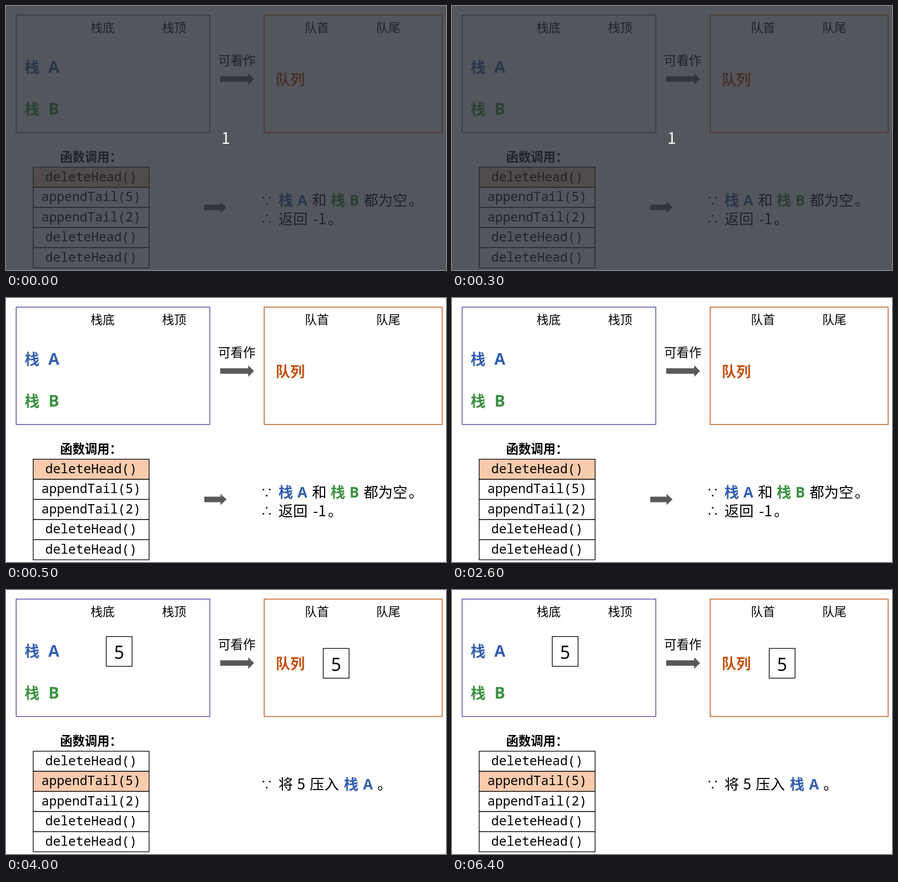
An HTML page with a canvas that plays this animation: 801 by 479 pixels, repeating every 8 s.

```html
<!DOCTYPE html>
<html lang="zh-CN">
<head>
<meta charset="utf-8">
<title>双栈实现队列</title>
<style>
  html, body { margin: 0; width: 100%; height: 100%; overflow: hidden; background: #fff; }
  canvas { display: block; }
</style>
</head>
<body>
<canvas id="stage" width="801" height="479"></canvas>
<script>
const ctx = document.getElementById('stage').getContext('2d');
const LOOP = 8000, START = 500, PUSH = 4000;
const BLUE = '#335fb0', GREEN = '#3a9140', ORANGE = '#c55114', GRAY = '#595959', BLACK = '#000';
const CJK = '"Noto Sans CJK SC", "Noto Sans CJK", sans-serif';
const LIGHT = '"Noto Sans CJK SC Light", "Noto Sans CJK SC DemiLight", ' + CJK;
const LATIN = '"Noto Sans", "Open Sans", sans-serif';
const MONO = '"Noto Sans Mono", monospace';
const CALLS = ['deleteHead()', 'appendTail(5)', 'appendTail(2)', 'deleteHead()', 'deleteHead()'];

function text(str, x, y, size, { family = CJK, weight = 400, color = BLACK, align = 'left' } = {}) {
  ctx.font = `${weight} ${size}px ${family}`;
  ctx.fillStyle = color;
  ctx.textAlign = align;
  ctx.fillText(str, x, y);
}

function box(x, y, w, h, color, line, fill) {
  if (fill) {
    ctx.fillStyle = fill;
    ctx.fillRect(x, y, w, h);
  }
  ctx.strokeStyle = color;
  ctx.lineWidth = line;
  ctx.strokeRect(x, y, w, h);
}

function arrow(x, y, shaft, length, half, head) {
  ctx.fillStyle = GRAY;
  ctx.beginPath();
  ctx.moveTo(x, y - half);
  ctx.lineTo(x + shaft, y - half);
  ctx.lineTo(x + shaft, y - head);
  ctx.lineTo(x + length, y);
  ctx.lineTo(x + shaft, y + head);
  ctx.lineTo(x + shaft, y + half);
  ctx.lineTo(x, y + half);
  ctx.fill();
}

function panels() {
  box(18.5, 16.5, 352.5, 213, '#3c3c9c', 1.3);
  box(470, 16.5, 324, 213, ORANGE, 1.4);
  const label = (str, x) => text(str, x, 46.7, 22, { family: LIGHT, weight: 300 });
  label('栈底', 154);
  label('栈顶', 284);
  label('队首', 544);
  label('队尾', 674);

  const stack = (name, y, color) => {
    text('栈', 34, y, 27, { weight: 700, color });
    text(name, 87, y, 29, { family: LATIN, weight: 700, color, align: 'center' });
  };
  stack('A', 121, BLUE);
  stack('B', 196.5, GREEN);
  text('队列', 491, 143, 26.5, { weight: 700, color: ORANGE });
  text('可看作', 386, 106.5, 22.8);
  arrow(390, 132.5, 51, 61.5, 5, 10.5);
}

function callList(active) {
  text('函数调用：', 98.5, 281.5, 22.5, { weight: 700 });
  const step = 36.5;
  CALLS.forEach((call, i) => {
    const y = 292.5 + i * step;
    box(49.5, y, 211, step, BLACK, 1.3, i === active ? '#f8cbad' : '#fff');
    text(call, 155, y + 25.3, 23.2, { family: MONO, align: 'center' });
  });
}

function stackName(name, x, letterX, color) {
  text('栈', x, 362, 26.5, { weight: 700, color });
  text(name, letterX, 362, 26, { family: LATIN, weight: 600, color, align: 'center' });
}

function note(str, x, y) {
  text(str, x, y, 26.6, { family: LIGHT, weight: 300 });
}

function sign(str, y) {
  text(str, 474.5, y, 22, { align: 'center' });
}

function emptyScene() {
  callList(0);
  arrow(361, 365.5, 29.5, 40.5, 5, 10);
  sign('∵', 361);
  stackName('A', 496, 539.5, BLUE);
  note('和', 557, 362);
  stackName('B', 591, 634, GREEN);
  note('都为空', 651, 362);
  note('。', 733, 362);
  sign('∴', 394);
  note('返回', 496, 395.5);
  note('-1', 559, 395.5);
  note('。', 586, 395.5);
}

function item(value, x, y) {
  box(x, y, 47, 54, BLACK, 1.3);
  text(value, x + 23.5, y + 40.5, 32, { family: LATIN, align: 'center' });
}

function pushScene() {
  callList(1);
  item('5', 182.5, 84.5);
  item('5', 577.5, 106);
  sign('∵', 361);
  note('将', 496, 362);
  note('5', 530, 362);
  note('压入', 553, 362);
  stackName('A', 615, 659, BLUE);
  note('。', 676, 362);
}

function cover() {
  ctx.fillStyle = 'rgba(40, 44, 52, 0.8)';
  ctx.fillRect(0, 0, 801, 479);
  text('1', 400, 250, 28, { color: '#fff', align: 'center' });
}

function draw() {
  const t = performance.now() % LOOP;
  ctx.fillStyle = '#fff';
  ctx.fillRect(0, 0, 801, 479);
  panels();
  if (t < PUSH) emptyScene();
  else pushScene();
  if (t < START) cover();
  requestAnimationFrame(draw);
}
draw();
</script>
</body>
</html>
```
